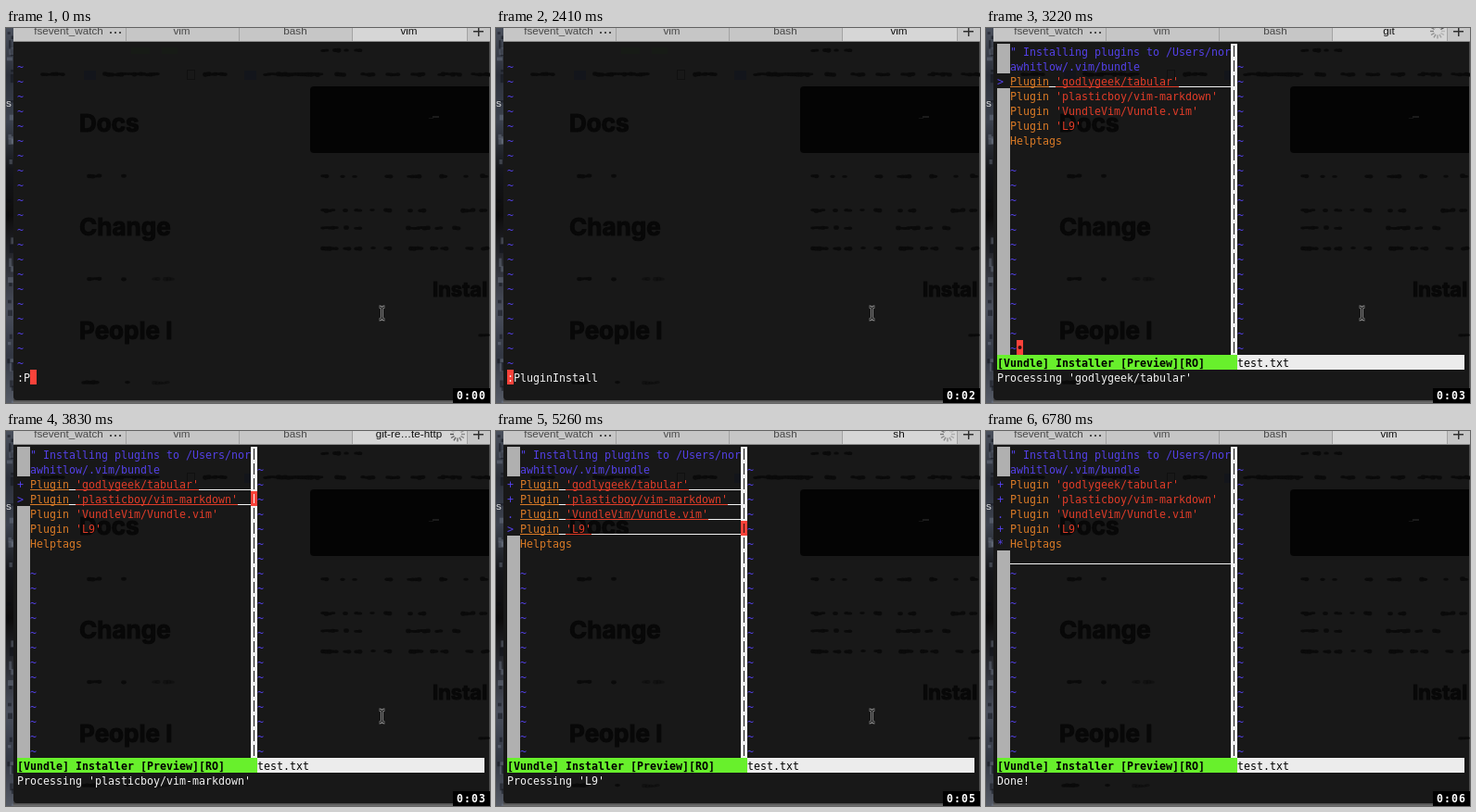
These frames come from a looping animation (522x405 px, 6950 ms). An HTML page with a canvas:

```html
<!DOCTYPE html>
<html lang="en">
<head>
<meta charset="utf-8">
<title>Plugin install</title>
<style>
html, body { margin: 0; width: 522px; height: 405px; overflow: hidden; background: #181818; }
canvas { display: block; }
</style>
</head>
<body>
<canvas id="stage" width="522" height="405"></canvas>
<script>
const W = 522, H = 405, LOOP = 6950;
const CW = 7, CH = 16, LEFT = 12, TOP = 17;
const MONO = '11.63px "DejaVu Sans Mono", monospace';
const UI = '11.7px "Liberation Sans", Arial, sans-serif';
const BLUE = '#5340e6', ORANGE = '#d97a26', RED = '#e03c28', CURSOR = '#fa423a', WHITE = '#f2f2f2', GREEN = '#68f02c';
const PLUGINS = ['godlygeek/tabular', 'plasticboy/vim-markdown', 'VundleVim/Vundle.vim', 'L9'];
const COMMAND = ':PluginInstall';

const KEYS = [180, 270, 360, 710, 800, 980, 1340, 1430, 1520, 1600, 1690, 1780];
const ENTER = 2410, OPEN = 2590, DONE = 5430, BLINK = 6780;
const STARTS = [OPEN, 3480, 4370, 4550];
const TICKS = [1080, 2050, 3040, 4020, 5080, 6060];
const TITLES = [[0, 'vim'], [OPEN, 'git'], [3660, 'git-re…te-http'], [4370, 'git'],
  [4640, 'git-re…te-http'], [5170, 'sh'], [DONE, 'vim']];

const ctx = document.getElementById('stage').getContext('2d');
const backdrop = document.createElement('canvas');
backdrop.width = W;
backdrop.height = H;

const colX = c => LEFT + c * CW;
const rowY = r => TOP + r * CH;
const passed = (times, t) => times.filter(x => x <= t).length;

function box(g, color, x, y, w, h) {
  g.fillStyle = color;
  g.fillRect(x, y, w, h);
}

function write(str, col, row, color, bold) {
  ctx.font = (bold ? 'bold ' : '') + MONO;
  ctx.fillStyle = color;
  ctx.textAlign = 'left';
  ctx.fillText(str, colX(col), rowY(row) + 13);
}

function label(g, str, x, color) {
  g.font = UI;
  g.textAlign = 'center';
  g.fillStyle = color;
  g.fillText(str, x, 7);
}

function gradient(g, y0, y1, colors) {
  const grad = g.createLinearGradient(0, y0, 0, y1);
  colors.forEach((c, i) => grad.addColorStop(i / (colors.length - 1), c));
  return grad;
}

let seed = 7;
function rand() {
  seed = (seed * 16807) % 2147483647;
  return seed / 2147483647;
}

// Uneven dark streaks given as x, width pairs.
function smudge(g, y, ...spans) {
  g.fillStyle = '#0a0a0a';
  for (let i = 0; i < spans.length; i += 2) {
    for (let x = 2; x < spans[i + 1]; x += 3.5) {
      g.beginPath();
      g.ellipse(spans[i] + x, y + rand() - 0.5, 2.8, 1.3 + rand() * 1.2, 0, 0, 7);
      g.fill();
    }
  }
}

function heading(g, str, x, y, size) {
  g.font = `bold ${size}px Inter, "Open Sans", sans-serif`;
  g.textAlign = 'left';
  g.fillStyle = g.strokeStyle = '#080808';
  g.lineWidth = 1;
  g.lineJoin = 'round';
  g.fillText(str, x, y);
  g.strokeText(str, x, y);
}

function paintBackdrop() {
  const g = backdrop.getContext('2d');
  box(g, gradient(g, 0, H, ['#4a505c', '#2c303a', '#3c424e', '#15161a', '#0d0c0c', '#2a2c33', '#4a4f5c', '#333844', '#565b66']), 0, 0, W, H);
  for (let i = 0; i < 34; i++) {
    box(g, rand() < 0.5 ? 'rgba(130,138,155,.35)' : 'rgba(10,12,18,.45)', rand() * 6, rand() * H, 2 + rand() * 4, 2 + rand() * 8);
  }
  g.font = UI;
  g.fillStyle = '#dcdcdc';
  g.fillText('s', 0, 85);
  box(g, gradient(g, 401, H, ['#3c3c3c', '#747474']), 8, 401, W - 8, 4);

  g.fillStyle = '#181818';
  g.beginPath();
  g.roundRect(8, 0, W - 9, 402, [0, 0, 4, 4]);
  g.fill();
  box(g, '#4c4c4c', W - 1, 14, 1, 387);

  smudge(g, 24, 340, 8, 353, 6, 365, 5, 376, 9);
  smudge(g, 50, 38, 24, 105, 60, 213, 25, 278, 62, 355, 12, 383, 13, 410, 14, 437, 13, 466, 24, 502, 20);
  smudge(g, 160, 88, 14, 125, 5, 340, 7, 361, 4, 374, 4, 409, 9, 433, 14, 468, 6, 494, 5, 512, 6);
  smudge(g, 197, 340, 16, 364, 5, 376, 6, 393, 5, 408, 7, 434, 5, 445, 8, 491, 14, 511, 9);
  smudge(g, 216, 340, 17, 365, 4, 376, 8, 432, 26, 463, 9, 482, 6);
  smudge(g, 238, 340, 18, 364, 6, 376, 8, 394, 5, 408, 8, 435, 13, 458, 6, 469, 7, 496, 7, 513, 7);
  smudge(g, 271, 88, 14, 125, 5);
  smudge(g, 332, 510, 11);
  smudge(g, 383, 82, 18, 129, 5);
  g.globalAlpha = 0.5;
  smudge(g, 271, 158, 8, 170, 12);
  smudge(g, 383, 158, 18);
  g.globalAlpha = 1;
  box(g, '#171b16', 135, 21, 20, 7);
  box(g, '#171b16', 168, 21, 17, 7);
  for (const x of [84, 257]) box(g, '#13151b', x, 46, 13, 10);
  g.strokeStyle = '#101010';
  g.strokeRect(195.5, 45.5, 8, 10);

  g.fillStyle = '#040404';
  g.beginPath();
  g.roundRect(328, 63, 193, 72, [4, 0, 0, 4]);
  g.fill();
  box(g, '#1c1c1c', 460, 95, 7, 2);
  box(g, '#141414', 456, 97, 5, 1);

  heading(g, 'Docs', 79, 112, 26);
  heading(g, 'Change', 79, 224, 26);
  heading(g, 'People I', 79, 336, 26);
  heading(g, 'Instal', 460, 290, 22);

  box(g, '#c6c6c6', 8, 0, W - 8, 14);
  box(g, '#d6d6d6', 374, 0, 123, 14);
  for (const x of [129, 251, 373, 497]) box(g, '#a2a2a2', x, 0, 1, 14);
  box(g, '#8c8c8c', 8, 14, W - 8, 1);
  label(g, 'fsevent_watch', 67.5, '#484848');
  label(g, 'vim', 189.5, '#484848');
  label(g, 'bash', 312, '#484848');
  for (let i = 0; i < 3; i++) box(g, '#484848', 112 + i * 5, 4, 2, 2);
  box(g, '#303030', 504, 3, 11, 1.5);
  box(g, '#303030', 509, 0, 1.5, 9);
}

function cursor(col, row) {
  box(ctx, CURSOR, colX(col), rowY(row), CW, CH);
}

function underline(row, col, len, color) {
  box(ctx, color, colX(col), rowY(row) + 14, len * CW, 1);
}

function spinner(t) {
  const step = Math.floor(t / 89);
  ctx.lineWidth = 1.4;
  for (let i = 0; i < 12; i++) {
    const a = i * Math.PI / 6;
    ctx.strokeStyle = `rgba(60,60,60,${0.2 + 0.65 * ((i - step % 12 + 24) % 12) / 11})`;
    ctx.beginPath();
    ctx.moveTo(487 + 4 * Math.cos(a), 3.5 + 4 * Math.sin(a));
    ctx.lineTo(487 + 8 * Math.cos(a), 3.5 + 8 * Math.sin(a));
    ctx.stroke();
  }
}

function editor(t) {
  for (let r = 1; r < 22; r++) write('~', 0, r, BLUE);
  const typed = COMMAND.slice(0, 2 + passed(KEYS, t));
  const col = t < ENTER ? typed.length : 0;
  cursor(col, 22);
  write(typed, 0, 22, WHITE);
}

function installer(t) {
  const done = t >= DONE;
  const current = passed(STARTS, t) - 1;

  box(ctx, '#b0b0b0', LEFT, TOP, 14, 21 * CH);
  write('" Installing plugins to /Users/nor', 2, 0, BLUE);
  write('awhitlow/.vim/bundle', 2, 1, BLUE);

  PLUGINS.forEach((name, i) => {
    const row = i + 2, quoted = `'${name}'`;
    if (i <= current) {
      box(ctx, '#181818', LEFT, rowY(row), 14, CH);
      write(i === current && !done ? '>' : i === 2 ? '.' : '+', 0, row, BLUE);
      if (!done) {
        underline(row, 2, 34, WHITE);
        underline(row, 2, 6, ORANGE);
        underline(row, 9, quoted.length, RED);
      }
    }
    write('Plugin', 2, row, ORANGE);
    write(quoted, 9, row, RED);
  });

  if (done) {
    box(ctx, '#181818', LEFT, rowY(6), 14, CH);
    write('*', 0, 6, BLUE);
    underline(7, 2, 34, WHITE);
  }
  write('Helptags', 2, 6, ORANGE);

  for (let r = 1; r < 21; r++) {
    if (r > 7) write('~', 2, r, BLUE);
    write('~', 37, r, BLUE);
  }
  box(ctx, WHITE, colX(36), TOP, CW, 21 * CH);
  for (let r = 0; r < 21; r++) box(ctx, '#111', colX(36) + 3, rowY(r) + 2, 1, 12);

  if (done) {
    if (t < BLINK) cursor(2, 7);
  } else if (current === 0) {
    cursor(3, 20);
    ctx.fillStyle = '#301010';
    ctx.beginPath();
    ctx.arc(36.5, rowY(20) + 8, 2, 0, 7);
    ctx.fill();
  } else {
    cursor(36, current + 2);
    box(ctx, current === 1 ? WHITE : '#301010', colX(36) + 3, rowY(current + 2) + 3, 1, 10);
  }

  box(ctx, GREEN, LEFT, rowY(21), 37 * CW, CH);
  box(ctx, '#ececec', colX(37), rowY(21), 35 * CW, CH);
  write('[Vundle] Installer [Preview][RO]', 0, 21, '#000', true);
  write('test.txt', 37, 21, '#000');
  write(done ? 'Done!' : `Processing '${PLUGINS[current]}'`, 0, 22, WHITE);
}

function pointer(t) {
  // The pointer advances in seven even time steps and slips under the clock.
  const n = t < 5970 ? 0 : Math.min(7, Math.floor((t - 5970) / 90) + 1);
  const p = n / 7, e = p * p * (3 - 2 * p);
  const x = 405.5 + 100 * e, y = 308 + 98 * e;
  for (const [width, color] of [[3, '#858585'], [1, '#141414']]) {
    ctx.lineWidth = width;
    ctx.strokeStyle = color;
    ctx.beginPath();
    for (const s of [-1, 1]) {
      ctx.moveTo(x - 3, y + s * 7);
      ctx.quadraticCurveTo(x, y + s * 7, x, y + s * 4);
      ctx.quadraticCurveTo(x, y + s * 7, x + 3, y + s * 7);
    }
    ctx.moveTo(x, y - 5);
    ctx.lineTo(x, y + 5);
    ctx.stroke();
  }
}

function clock(t) {
  box(ctx, '#000', 482, 389, 40, 16);
  ctx.font = 'bold 11.5px "DejaVu Sans Mono", monospace';
  ctx.textAlign = 'center';
  ctx.fillStyle = '#fff';
  [...'0:0' + passed(TICKS, t)].forEach((c, i) => ctx.fillText(c, 489.5 + i * 8, 401));
}

function draw(t) {
  ctx.drawImage(backdrop, 0, 0);
  label(ctx, TITLES.filter(s => s[0] <= t).pop()[1], 434.5, '#101010');
  if (t >= OPEN && t < DONE) spinner(t);
  if (t < OPEN) editor(t);
  else installer(t);
  pointer(t);
  clock(t);
}

paintBackdrop();
const start = performance.now();
function tick() {
  draw((performance.now() - start) % LOOP);
  requestAnimationFrame(tick);
}
tick();
</script>
</body>
</html>
```
